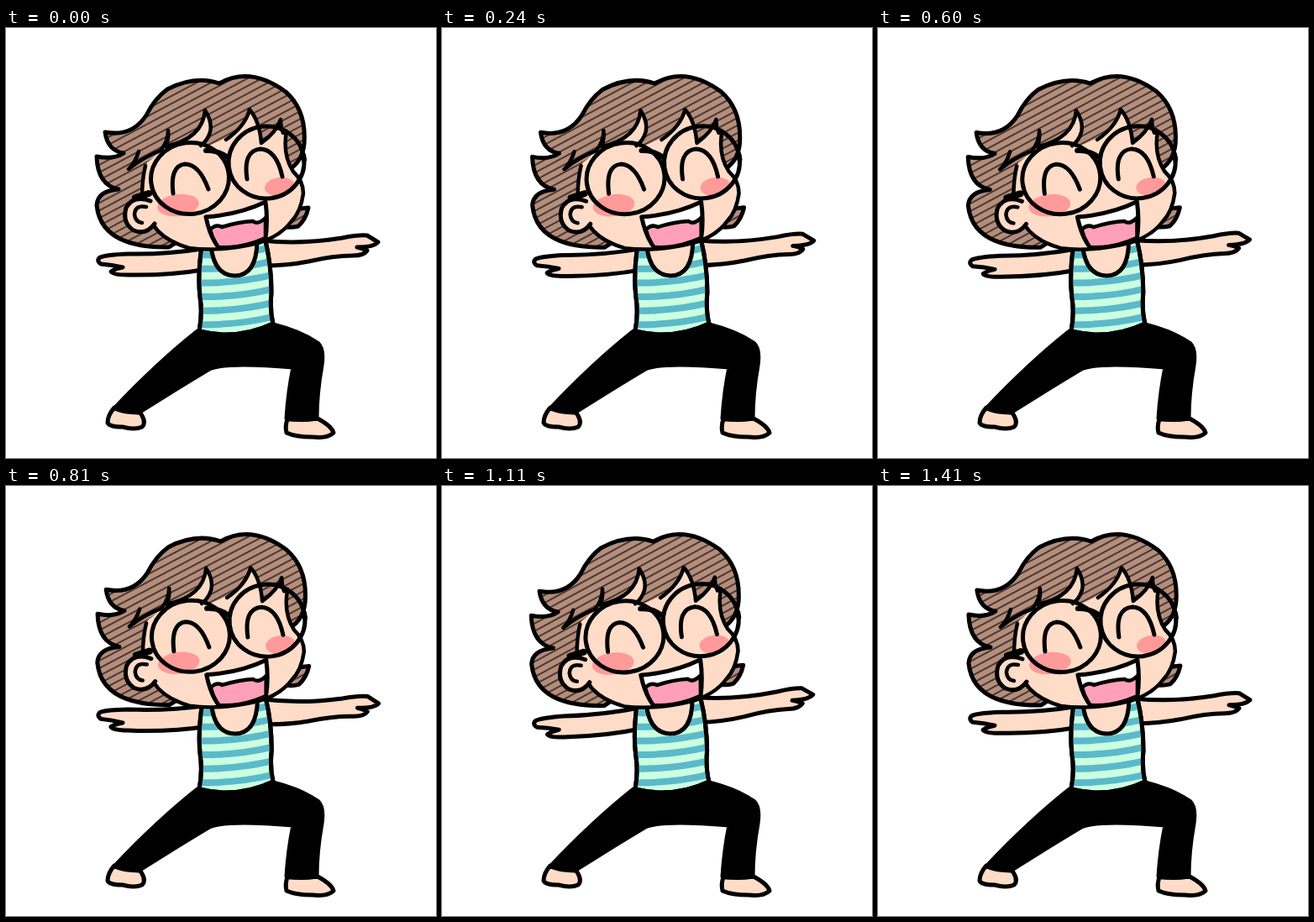
Animation of 512 by 512 pixels, one loop 1590 ms. Source, as an HTML page:

```html
<!DOCTYPE html>
<html>
<head>
<meta charset="utf-8">
<style>
html, body { margin: 0; width: 100%; height: 100%; overflow: hidden; background: #fff; }
svg { display: block; width: 100vw; height: 100vh; }
.line { fill: none; }
.skin { fill: #ffdcc8; }
.hair { fill: url(#hatch); }
.blush { fill: #ff9a9a; stroke: none; }
</style>
</head>
<body>
<svg viewBox="0 0 512 512" stroke="#000" stroke-width="5" stroke-linecap="round" stroke-linejoin="round">
  <defs>
    <pattern id="hatch" width="8" height="8" patternUnits="userSpaceOnUse" patternTransform="rotate(-28)">
      <rect width="8" height="8" fill="#b38e7d" stroke="none"/>
      <path d="M-1 4H9" stroke="#2a1a14" stroke-width="1.3"/>
    </pattern>
    <path id="shirt" d="M233 260Q228 295 231 320Q234 340 230 361Q276 372 318 352Q314 336 316 315Q316 280 308 250Z"/>
    <clipPath id="shirtClip"><use href="#shirt"/></clipPath>
  </defs>

  <g id="arms" class="skin">
    <path d="M240 262Q190 270 145 269Q120 270 112 273Q107 277 113 281Q126 282 139 285Q131 286 125 290Q127 294 145 294Q195 295 240 287Z"/>
    <path d="M305 253Q350 258 400 250Q420 246 430 247L443 255Q438 261 418 261Q424 262 430 265Q426 271 413 271Q390 271 360 278Q335 283 305 283Z"/>
  </g>

  <g class="skin">
    <path d="M129 452Q121 461 121 470Q123 475 139 475Q153 479 162 475Q168 469 159 457Z"/>
    <path d="M335 466Q332 474 334 482Q345 487 365 487Q383 489 390 482Q388 474 371 465Z"/>
  </g>
  <path d="M228 361Q180 399 129 453Q142 458 158 458Q205 428 242 406Q262 397 342 404Q336 433 334 465Q352 468 370 465Q370 435 376 402Q379 382 371 375Q350 361 318 353Z"/>

  <g id="torso">
    <use href="#shirt" fill="#ccffe0"/>
    <path id="stripes" class="line" clip-path="url(#shirtClip)" stroke="#5bbaca" stroke-width="8" stroke-linecap="butt"/>
    <path class="skin" d="M244 258Q247 294 272 295Q299 295 299 252Z"/>
    <use href="#shirt" fill="none"/>
  </g>

  <g id="head">
    <path class="hair" d="M338 217Q348 215 360 214Q357 228 348 236Q341 238 333 237Z"/>
    <path class="hair" d="M338 168Q353 158 355 138Q358 98 333 76Q291 45 254 66Q225 56 192 73Q177 84 167 104Q150 130 118 124Q121 146 140 149Q128 157 108 153Q109 187 134 192Q109 194 108 211Q113 262 194 261Z"/>
    <path class="skin" stroke="none" d="M163 202Q161 175 168 160Q188 147 193 122L192 140Q234 132 237 98L245 118L235 142Q277 130 290 97Q302 112 304 137Q320 128 327 109Q334 127 333 145Q336 168 350 181Q358 206 343 225Q329 245 300 256Q259 269 218 262Q181 251 172 230Z"/>
    <path class="line" stroke-width="4.5" d="M162 202Q162 180 166 164M158 147Q154 160 146 168Q163 154 184 146Q193 135 193 122Q194 133 190 141Q234 132 237 98Q246 112 243 124Q240 134 232 140M262 133Q285 117 290 97Q302 111 304 137Q322 124 327 109Q327 118 330 125M334 123Q329 151 342 171Q354 182 354 197Q351 219 340 230Q327 248 300 256Q255 267 218 262Q187 253 175 234"/>
    <path class="skin" d="M172 206Q152 198 143 214Q138 232 152 241Q167 247 177 233"/>
    <path class="line" stroke-width="4.5" d="M167 213Q154 210 153 222Q154 231 162 232"/>
    <path class="line" stroke-width="8" d="M154 202L170 197"/>
    <ellipse class="blush" cx="205" cy="211" rx="25" ry="13" transform="rotate(-7 205 211)"/>
    <ellipse class="blush" cx="326" cy="189" rx="18" ry="11" transform="rotate(-7 326 189)"/>
    <path class="line" d="M199 197Q195 164 213 162Q230 162 241 192M287 180Q282 146 303 144Q322 145 329 177"/>
    <ellipse class="line" cx="219" cy="179" rx="46.5" ry="42.5" transform="rotate(-7 219 179)"/>
    <ellipse class="line" cx="310" cy="160" rx="45" ry="43" transform="rotate(-7 310 160)"/>
    <path class="line" stroke-width="6" d="M238 146Q252 145 264 154M354 151L355 157"/>
    <path d="M238 225Q278 222 309 207Q312 229 309 250Q280 263 253 261Q243 249 238 225Z" fill="#fff"/>
    <path d="M243 240Q250 233 257 237Q276 231 294 230Q300 235 309 226L309 250Q280 263 253 261Q246 252 243 240Z" fill="#ffa0b8" stroke-width="4.5"/>
  </g>
</svg>
<script>
const LOOP = 1590, REST = 0.4;
const byId = id => document.getElementById(id);

// Turning points of the sway: [ms, lean], eased between neighbours.
const KEYS = [[0, REST], [70, 1], [440, -1], [770, 1], [1260, -1], [1410, 0.35], [LOOP, REST]];

let stripes = "";
for (let y = 270; y < 370; y += 16.6) stripes += `M222 ${y}Q275 ${y + 2} 325 ${y - 11}`;
byId("stripes").setAttribute("d", stripes);

function stepTime(t) {
  if (t < 810) return Math.min(720, Math.floor(t / 60) * 60);
  return Math.min(1410, 810 + Math.floor((t - 810) / 60) * 60);
}

function leanAt(t) {
  const i = KEYS.findIndex(key => key[0] > t);
  const [t0, a] = KEYS[i - 1], [t1, b] = KEYS[i];
  return a + (b - a) * (1 - Math.cos(Math.PI * (t - t0) / (t1 - t0))) / 2;
}

const start = performance.now();
function draw() {
  const t = stepTime((performance.now() - start) % LOOP);
  const d = leanAt(t) - REST;
  const pose = (id, transform) => byId(id).setAttribute("transform", transform);
  pose("arms", `translate(${d * 0.5}) rotate(${d * 2.3} 272 270)`);
  pose("torso", `translate(0 360) skewX(${-d * 0.5}) translate(0 -360)`);
  pose("head", `translate(${d}) rotate(${d * 0.45} 270 260)`);
  requestAnimationFrame(draw);
}
draw();
</script>
</body>
</html>
```
